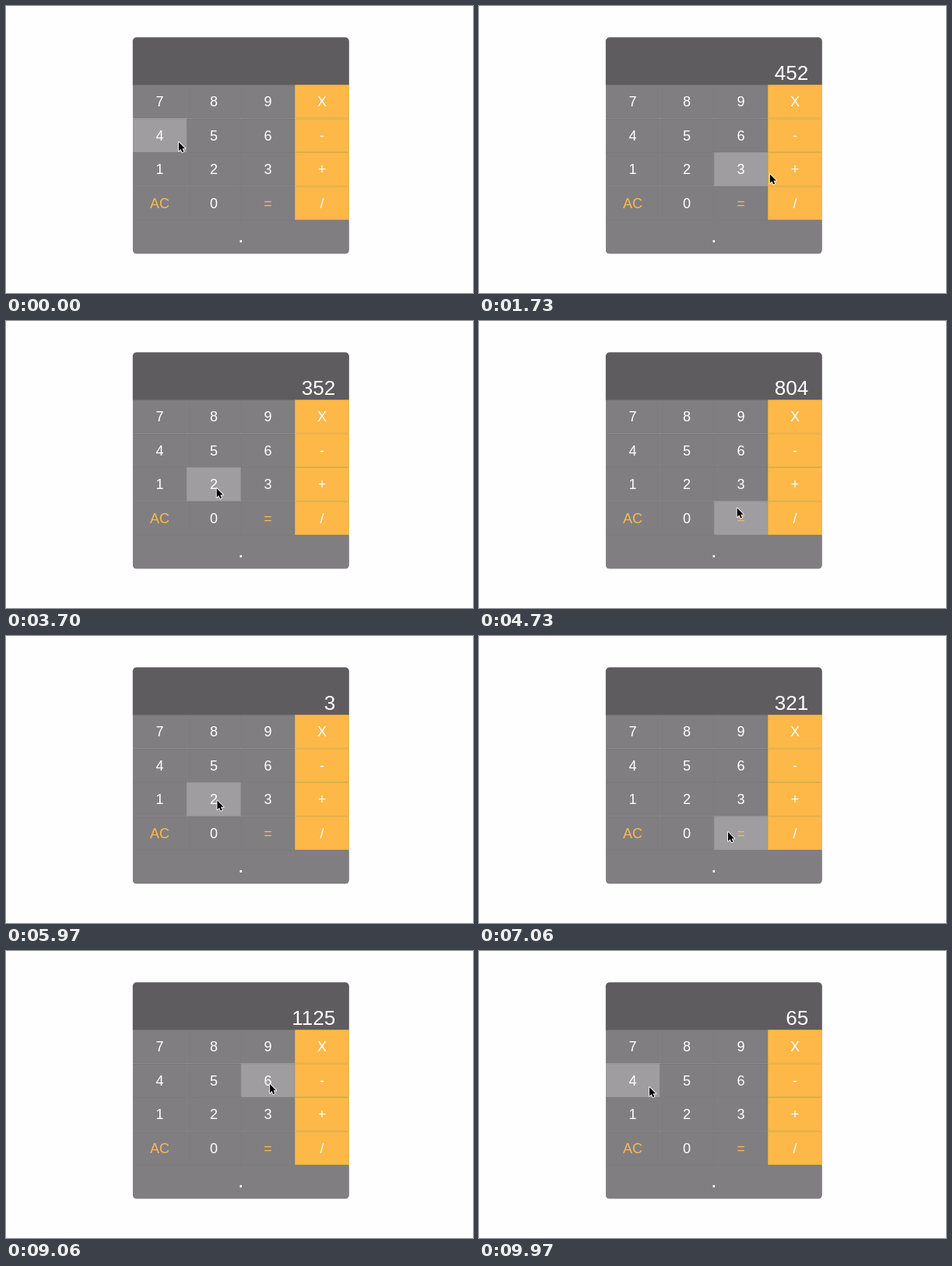
Write an HTML page that moves like this. It is 600 by 369 pixels and loops after 10000 ms.

```html
<!DOCTYPE html>
<html lang="en">
<head>
<meta charset="utf-8">
<title>Calculator</title>
<style>
html, body { margin: 0; width: 100%; height: 100%; overflow: hidden; background: #fefefe; }
svg { display: block; width: 600px; height: 369px; }
text { font-family: "Liberation Sans", Arial, sans-serif; font-size: 18px; fill: #fff; text-anchor: middle; }
#readout { font-size: 26px; text-anchor: end; }
.key { fill: #807e81; stroke: #6f6d70; stroke-width: .8; }
.key.op { fill: #fdb847; stroke: #cfa635; }
.key.on { fill: #9f9da0; stroke: #8c8a8d; }
.key.op.on { fill: #fdd28c; stroke: #e0bd78; }
text.accent { fill: #fbb94d; }
text.dot { font-size: 27px; }
</style>
</head>
<body>
<svg viewBox="0 0 600 369">
  <clipPath id="body"><rect x="162.8" y="40.2" width="278" height="278.4" rx="5"/></clipPath>
  <g clip-path="url(#body)">
    <rect x="162" y="40" width="280" height="62" fill="#5e5c5f"/>
    <g id="keys"></g>
  </g>
  <g id="labels"></g>
  <text id="readout" x="423.2" y="94.6"></text>
  <path id="cursor" d="M.4 .6V12.2L3 9.7L4.9 13.8L6.8 12.9L5 8.9H8.6Z"
        fill="#000" stroke="#fff" stroke-width="1.8" stroke-linejoin="round" paint-order="stroke"/>
</svg>
<script>
const LOOP = 10000, LAG = 30;
const $ = id => document.getElementById(id);

function add(parent, tag, attrs, text = "") {
  const el = document.createElementNS("http://www.w3.org/2000/svg", tag);
  for (const k in attrs) el.setAttribute(k, attrs[k]);
  el.textContent = text;
  return parent.appendChild(el);
}

const LEFT = 162.8, TOP = 101, W = 69.5, H = 43.55, INSET = .4;
const keys = {};

function addKey(label, col, row, span = 1) {
  const x = LEFT + col * W, y = TOP + row * H, w = W * span;
  const el = add($("keys"), "rect", {
    x: x + INSET, y: y + INSET, width: w - 2 * INSET, height: H - 2 * INSET,
    class: col === 3 ? "key op" : "key"
  });
  const kind = "AC=".includes(label) ? "accent" : label === "." ? "dot" : "";
  add($("labels"), "text", { x: x + w / 2, y: y + 28.3, class: kind }, label);
  keys[label] = { el, x, y, w };
}

["7 8 9 X", "4 5 6 -", "1 2 3 +", "AC 0 = /"].forEach((line, row) =>
  line.split(" ").forEach((label, col) => addKey(label, col, row)));
addKey(".", 0, 4, 4);

// Each stop: key, arrival, departure and the pointer's offset from the key's centre.
// A key is pressed on departure unless it is only hovered.
const stop = (label, from, to, dx = 2, dy = 4, hover = false) => ({
  label, from, to, hover,
  x: keys[label].x + W / 2 + dx,
  y: keys[label].y + H / 2 + dy
});

const stops = [
  stop("4", 0, 200, 24, 8), stop("5", 600, 750), stop("2", 1150, 1360),
  stop("+", 1860, 2060, -12, 6), stop("3", 2180, 2390),
  stop("9", 2550, 2730, -28, 14, true), stop("5", 2825, 3050, 0, -14),
  stop("2", 3450, 3650), stop("=", 4200, 4600, -16, -10),
  stop("+", 5200, 5350), stop("3", 5800, 5880, -24), stop("2", 5980, 6150, 3, 1),
  stop("1", 6450, 6600), stop("=", 7200, 7700), stop("+", 8090, 8300, -22, -14),
  stop("-", 8610, 8940, -8), stop("6", 9060, 9270), stop("5", 9390, 9610),
  stop("4", 9970, LOOP, 21, 8)
];

const ease = u => u * u * (3 - 2 * u);

function pointer(t) {
  const i = stops.findLastIndex(s => s.from <= t);
  const a = stops[i], b = stops[i + 1];
  if (!b || t <= a.to) return [a.x, a.y];
  const e = ease((t - a.to) / (b.from - a.to));
  return [a.x + (b.x - a.x) * e, a.y + (b.y - a.y) * e];
}

const sums = { "+": (a, b) => a + b, "-": (a, b) => a - b };

// Replays the presses made so far
function readout(t) {
  let shown = "", total = 0, op = null, fresh = true;
  for (const { label } of stops.filter(s => !s.hover && s.to <= t)) {
    if (label >= "0" && label <= "9") {
      shown = fresh ? label : shown + label;
      fresh = false;
      continue;
    }
    if (label === "=") shown = String(sums[op](total, Number(shown)));
    else op = label;
    total = Number(shown);
    fresh = true;
  }
  return shown;
}

function draw(now) {
  const t = now % LOOP;
  const [x, y] = pointer(t);
  $("cursor").setAttribute("transform", `translate(${x} ${y})`);

  // The highlight trails the pointer slightly
  const [hx, hy] = pointer(Math.max(0, t - LAG));
  for (const k of Object.values(keys)) {
    const on = hx >= k.x && hx < k.x + k.w && hy >= k.y && hy < k.y + H;
    k.el.classList.toggle("on", on);
  }

  $("readout").textContent = readout(t);
}

const start = performance.now();
function tick() {
  draw(performance.now() - start);
  requestAnimationFrame(tick);
}
tick();
</script>
</body>
</html>
```
